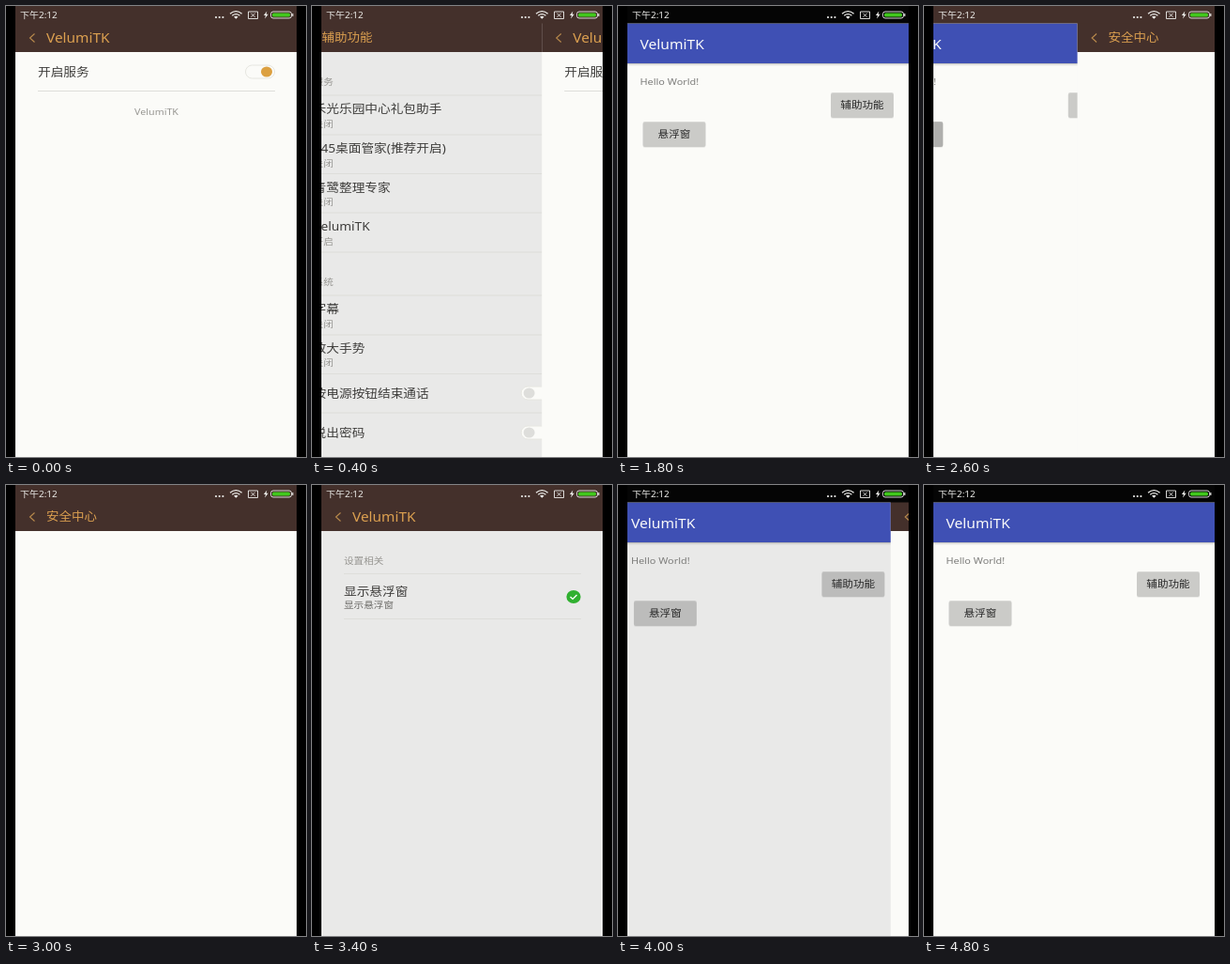
An HTML page that plays this animation: 320 px wide and 480 px high, repeating every 5400 ms.

```html
<!DOCTYPE html>
<html lang="zh">
<head>
<meta charset="utf-8">
<style>
  html, body { margin: 0; width: 100%; height: 100%; overflow: hidden; background: #000; }
  svg { display: block; width: 320px; height: 480px; }
  text { font-family: 'Noto Sans', 'Noto Sans CJK SC', 'Noto Sans CJK', sans-serif; }
</style>
</head>
<body>
<svg id="stage" viewBox="0 0 320 480"></svg>
<script>
const LOOP = 5400, STEP = 100, SLIDE = 500, WIDTH = 300, DIM = .07;
const APP = 'VelumiTK';
const INK = '#3e3d3b', SOFT = '#979692', RULE = '#dededa', PAPER = '#fbfbf8';
const BAR = '#44302b', GOLD = '#dca050', LIGHT = '#ededea';

const rect = (x, y, w, h, fill, extra = '') =>
  `<rect x="${x}" y="${y}" width="${w}" height="${h}" fill="${fill}" ${extra}/>`;
const path = (d, stroke, width = 1) =>
  `<path d="${d}" fill="none" stroke="${stroke}" stroke-width="${width}"/>`;

// The whole screen is squeezed to 90% height; y is the middle of the line.
const text = (x, y, size, fill, str, extra = '') =>
  `<text transform="translate(${x} ${y + size * .33}) scale(1 .9)" font-size="${size}" fill="${fill}" ${extra}>${str}</text>`;

const rule = y => rect(34, y - .5, 253, 1, RULE);
const label = (y, str, fill = SOFT) => text(34, y, 10.6, fill, str);
const item = (y, str) => text(34, y, 13.7, INK, str);
const chevron = y => path(`M281 ${y - 4}l5 4l-5 4`, '#b4b4b0');
const toggle = (y, on) =>
  rect(255.5, y - 7, 31, 14, PAPER, 'rx="7" stroke="#e6e6e0"') +
  `<ellipse cx="${on ? 278 : 264}" cy="${y}" rx="6" ry="5.5" fill="${on ? '#dca040' : '#dededb'}"/>`;
const entry = (y, str, state) => item(y, str) + label(y + 16, state) + chevron(y + 7);

const button = (id, x, y, str) =>
  rect(x, y + 1, 67, 27, '#000', 'rx="2" opacity=".06"') +
  rect(x, y, 67, 27, '#000', `id="${id}" rx="2" opacity=".14"`) +
  text(x + 33.5, y + 13.5, 11.6, '#262626', str, 'text-anchor="middle" font-weight="500"');

const page = (id, top, content) =>
  `<g id="${id}">${rect(10, 0, WIDTH, 480, PAPER)}` +
  rect(10, top, WIDTH, 480 - top, '#000010', 'class="dim" opacity="0"') + content + '</g>';

const settings = (id, title, size, content) =>
  page(id, 49, rect(10, 18, WIDTH, 31, BAR) +
    path('M30.5 29.5l-5 4.5l5 4.5', '#b98a4c', 1.1) +
    text(43, 34, size, GOLD, title, 'font-weight="500"') + content);

const pages =
  page('main', 61,
    rect(10, 61, WIDTH, 1, '#000', 'opacity=".22"') +
    rect(10, 62, WIDTH, 1.5, '#000', 'opacity=".08"') +
    rect(10, 18.5, WIDTH, 42.5, '#3f50b4') +
    text(23.5, 40.5, 15.6, '#fafafa', APP) +
    text(23.5, 80, 10.9, '#7c7c7a', 'Hello World!') +
    button('access', 227, 92, '辅助功能') +
    button('float', 26.5, 123, '悬浮窗')) +

  settings('list', '辅助功能', 13.5,
    label(81, '服务') + rule(95) +
    entry(109.5, '禾光乐园中心礼包助手', '关闭') + rule(137) +
    entry(151.5, '845桌面管家(推荐开启)', '关闭') + rule(178.5) +
    entry(193, '青鹭整理专家', '关闭') + rule(220) +
    entry(234.5, APP, '开启') + rule(262) +
    label(294, '系统') + rule(308) +
    entry(322.5, '字幕', '关闭') + rule(350) +
    entry(364, '放大手势', '关闭') + rule(391.5) +
    item(412, '按电源按钮结束通话') + toggle(412) + rule(433) +
    item(454, '说出密码') + toggle(454) +
    rect(304.5, 50, 2.5, 362, '#e2e2df')) +

  settings('guard', '安全中心', 13.5, '') +

  settings('detail', APP, 15.4,
    item(70, '开启服务') + toggle(70, true) + rule(90.5) +
    text(160.5, 112, 10.7, SOFT, APP, 'text-anchor="middle"')) +

  settings('popup', APP, 15.4,
    label(81, '设置相关') + rule(94.5) +
    item(113, '显示悬浮窗') + label(128, '显示悬浮窗', '#6c6b68') +
    '<ellipse cx="279" cy="119" rx="7.6" ry="6.9" fill="#30b030"/>' +
    path('M275.5 119l2.6 2.4l4.4-4.3', '#fff', 1.4) + rule(142.5));

const status =
  rect(10, 0, WIDTH, 18.5, '#000', 'id="status"') +
  text(15, 9.5, 10, LIGHT, '下午2:12') +
  [224, 227.7, 231.4].map(x => `<circle cx="${x}" cy="12" r="1.1" fill="${LIGHT}"/>`).join('') +
  path('M239 8.2q6.3-5 12.6 0M241.2 10.2q4.1-3.2 8.2 0', LIGHT, 1.3) +
  `<path d="M243 11.5q2.3-1.6 4.6 0l-2.3 2.2z" fill="${LIGHT}"/>` +
  path('M258.5 6h10v7.5h-10zM261.5 7.8l4 4M265.5 7.8l-4 4', LIGHT, .9) +
  `<path d="M278.3 5.5l-3.4 4.4h2l-.8 3.6l3.6-4.7h-2.1z" fill="${LIGHT}"/>` +
  rect(282.5, 6, 22, 7, 'none', `rx="2.5" stroke="${LIGHT}" stroke-width=".9"`) +
  rect(284, 7.4, 19, 4.2, '#40c81c', 'rx="1.5"') +
  rect(305.2, 8, 1.2, 3, LIGHT);

const stage = document.getElementById('stage');
stage.innerHTML = pages + status + rect(0, 0, 10, 480, '#000') + rect(310, 0, 10, 480, '#000');

const $ = id => document.getElementById(id);
const names = ['main', 'list', 'guard', 'detail', 'popup'];

// from: when the pair of pages is on; slide: when its slide starts;
// dimEnd: when the arriving page regains full brightness
const scenes = [
  { from: 0, slide: -SLIDE, top: 'detail', under: 'list', open: true, dimEnd: 0 },
  { from: 200, slide: 200, top: 'detail', under: 'list', open: false, dimEnd: 700 },
  { from: 1200, slide: 1200, top: 'list', under: 'main', open: false, dimEnd: 1700 },
  { from: 2500, slide: 2500, top: 'guard', under: 'main', open: true, dimEnd: 0 },
  { from: 3200, slide: 2500, top: 'popup', under: 'main', open: true, dimEnd: 3700 },
  { from: 3700, slide: 3700, top: 'popup', under: 'main', open: false, dimEnd: 4200 }
];

function draw(now) {
  const t = Math.floor(now % LOOP / STEP) * STEP;
  const { slide, top, under, open, dimEnd } = scenes.filter(s => s.from <= t).pop();
  const k = 1 - (1 - Math.min(1, (t - slide) / SLIDE)) ** 3;
  const away = open ? 1 - k : k;
  const arriving = open ? top : under;
  const current = (k > 0) === open ? top : under;

  for (const name of names) {
    const el = $(name);
    el.style.display = name === top || name === under ? '' : 'none';
    el.querySelector('.dim').setAttribute('opacity', name === arriving && t < dimEnd ? DIM : 0);
  }
  stage.insertBefore($(top), $('status'));
  $(top).setAttribute('transform', `translate(${WIDTH * away})`);
  $(under).setAttribute('transform', `translate(${-WIDTH / 2 * (1 - away)})`);
  $('status').setAttribute('fill', current === 'main' ? '#050505' : BAR);
  $('float').setAttribute('opacity', t >= 2300 && t < 3200 ? .26 : .14);
}

const start = performance.now();
(function tick() {
  draw(performance.now() - start);
  requestAnimationFrame(tick);
})();
</script>
</body>
</html>
```
